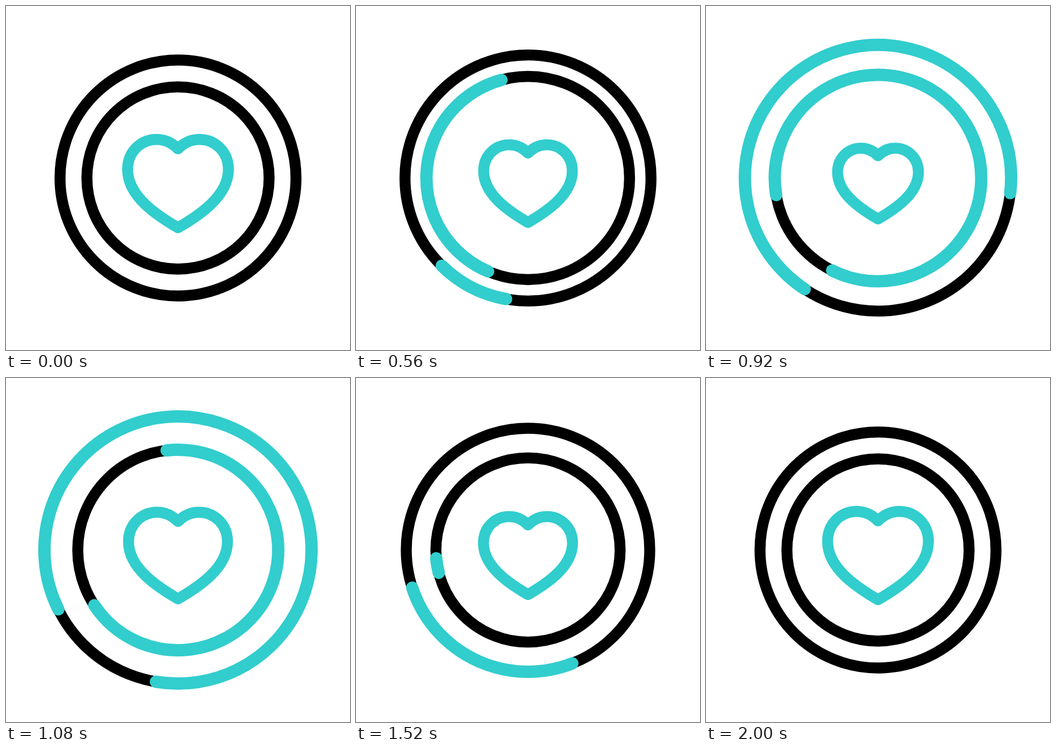
Animation of 640 by 640 pixels, one loop 2240 ms. Source, as an HTML page:

```html
<!DOCTYPE html>
<html lang="en">
<head>
<meta charset="utf-8">
<title>Heartbeat rings</title>
<style>
  html, body { margin: 0; width: 100%; height: 100%; overflow: hidden; background: #fff; }
  svg { display: block; width: 100%; height: 100%; }
  circle, path { fill: none; stroke-linecap: round; stroke-linejoin: round; }
  .base { stroke: #000; stroke-width: 20.4; }
  .arc { stroke: #32cdcd; stroke-width: 23; }
  .heart { stroke: #32cdcd; stroke-width: 20.4; vector-effect: non-scaling-stroke; }
</style>
</head>
<body>
<svg viewBox="0 0 640 640">
  <g id="outer" transform="translate(320 320)">
    <circle class="base"/>
    <circle class="arc" pathLength="360"/>
  </g>
  <g id="inner" transform="translate(320 320)">
    <circle class="base"/>
    <circle class="arc" pathLength="360"/>
  </g>
  <path id="heart" class="heart" d="M0-64.6 C-11-76-25-82.2-39.7-82.2 C-70-82.2-93.75-58-93.75-26.5
    C-93.75 24-38 60 0 82.1 C38 60 93.75 24 93.75-26.5 C93.75-58 70-82.2 39.7-82.2 C25-82.2 11-76 0-64.6Z"/>
</svg>
<script>
const LOOP = 2240, STEP = 40;

const ring = (id, delay, radius, swell) => {
  const [base, arc] = document.getElementById(id).children;
  return { base, arc, delay, radius, swell };
};
const rings = [ring('outer', 400, 219.5, 29), ring('inner', 200, 169.5, 23.5)];
const heart = document.getElementById('heart');

// [time, value] pairs
const swellKeys = [[0, 0], [200, .4255], [360, .828], [560, .99], [680, 1], [880, .723],
  [1080, .298], [1120, .241], [1320, .08], [1480, .02], [1600, 0]];
const beatKeys = [[200, 1], [480, .75], [724, 1.265], [968, .75], [1208, 1.265],
  [1440, .75], [1680, 1.265], [2000, 1]];

const clamp = x => Math.min(1, Math.max(0, x));
const ease = x => { x = clamp(x); return x * x * (3 - 2 * x); };

// Index of the key segment holding t
const segment = (keys, t) => {
  let i = 0;
  while (i < keys.length - 2 && t > keys[i + 1][0]) i++;
  return i;
};

function eased(keys, t) {
  const i = segment(keys, t);
  const [t0, v0] = keys[i], [t1, v1] = keys[i + 1];
  return v0 + (v1 - v0) * ease((t - t0) / (t1 - t0));
}

// Smooth curve through all keys, flat at both ends
function spline(keys, t) {
  const i = segment(keys, t);
  const slope = k => {
    const a = keys[k - 1], b = keys[k + 1];
    return a && b ? (b[1] - a[1]) / (b[0] - a[0]) : 0;
  };
  const [t0, v0] = keys[i], [t1, v1] = keys[i + 1];
  const d = t1 - t0, x = clamp((t - t0) / d), y = 1 - x;
  return v0 + (v1 - v0) * ease(x) + d * x * y * (slope(i) * y - slope(i + 1) * x);
}

function drawRing({ base, arc, delay, radius, swell }, t) {
  const s = t - delay;
  const r = radius + swell * spline(swellKeys, s);
  base.setAttribute('r', r);
  arc.setAttribute('r', r);

  const tail = 360 * ease((s - 560) / 840);
  const head = 360 * ease(s / 840);
  const turn = 90 + 90 * s / 1400;
  arc.style.display = s > 0 && head > tail ? '' : 'none';
  arc.setAttribute('stroke-dasharray', `${head - tail} 360`);
  arc.setAttribute('transform', `rotate(${turn + tail})`);
}

function draw(now) {
  const t = Math.floor(now % LOOP / STEP) * STEP;
  rings.forEach(r => drawRing(r, t));
  heart.setAttribute('transform', `translate(320 330.4) scale(${eased(beatKeys, t)})`);
}

const start = performance.now();
function tick() {
  draw(performance.now() - start);
  requestAnimationFrame(tick);
}
tick();
</script>
</body>
</html>
```
